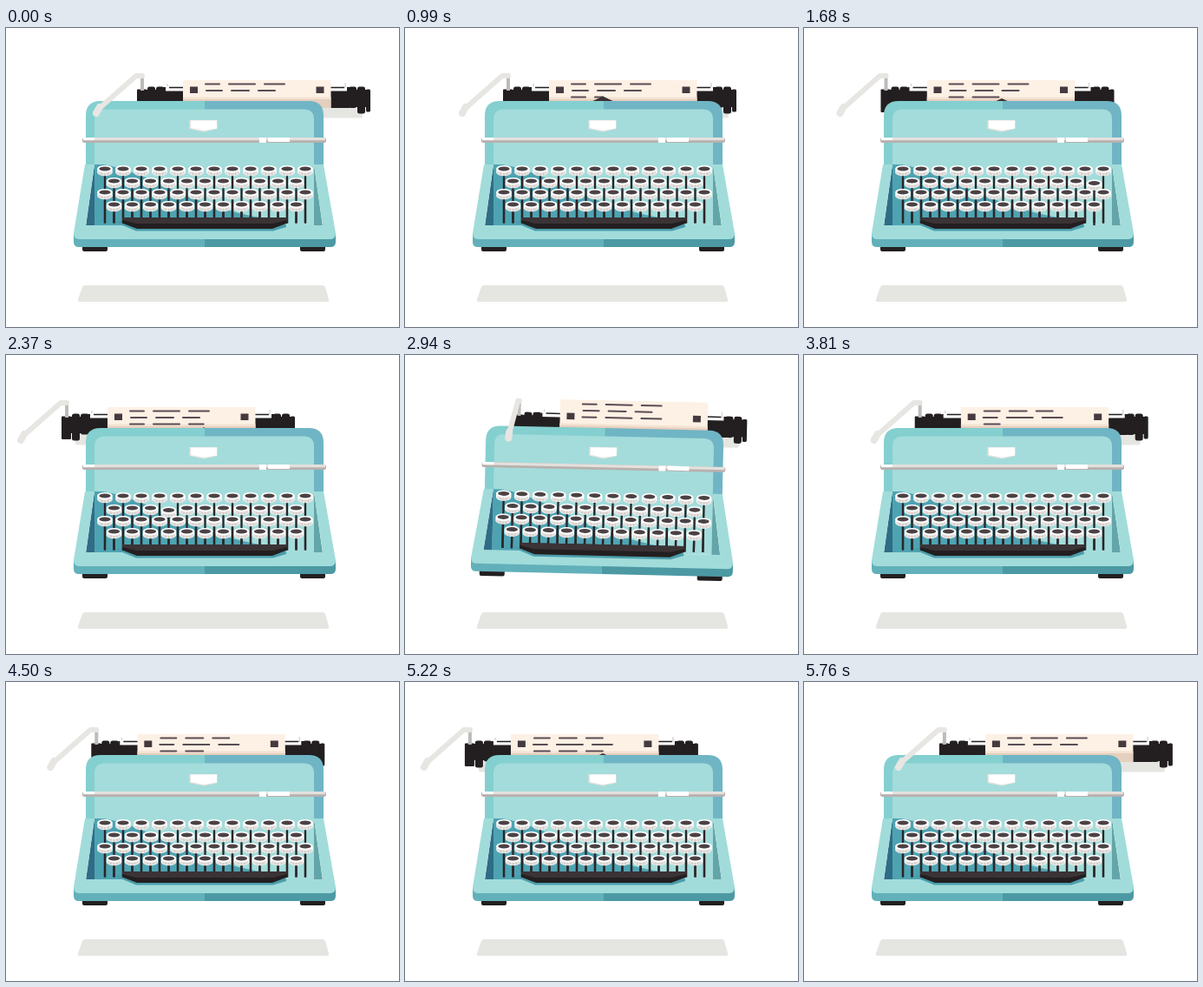
Recreate the animation shown at these times as an HTML page. Size 453x344 px, loop 5.91 s.

```html
<!DOCTYPE html>
<html lang="en">
<head>
<meta charset="utf-8">
<title>Typewriter</title>
<style>
  html, body { margin: 0; width: 100%; height: 100%; overflow: hidden; background: #fff; }
  svg { display: block; }
  .ink { fill: #231f20; }
  .pale { fill: #e5e5e1; }
  .words { stroke: #5b4c54; stroke-width: 2; stroke-linecap: round; fill: none; }
  .lever { stroke: #e7e6e3; fill: none; stroke-linecap: round; stroke-linejoin: round; }
  .lever path { vector-effect: non-scaling-stroke; }
</style>
</head>
<body>
<svg width="453" height="344" viewBox="0 0 453 344">
  <defs>
    <path id="lineA" class="words" d="M26 2h16M53 2h30M94 2h23"/>
    <path id="lineB" class="words" d="M27 2h18M56 2h20M87 2h19"/>
    <g id="key">
      <path d="M-8.7-2.5V2.2A8.7 4 0 0 0 8.7 2.2V-2.5z" fill="#fff"/>
      <path d="M-8.2 3A8.7 4 0 0 0 8.2 3L7 .6A8 4 0 0 1-7 .6z" fill="#e3dedb"/>
      <path d="M-3.5 2.3v3.4M0 2.7v3.4M3.5 2.3v3.4" stroke="#cbc4c0" stroke-width=".8"/>
      <ellipse cy="-2.2" rx="8.7" ry="3.9" fill="#fff"/>
      <ellipse cy="-2.1" rx="6.6" ry="2.5" fill="#4b4245"/>
    </g>
  </defs>

  <path d="M91 296H365Q367 296 368 298L372 312Q373 315 370 315H85Q82 315 83 312L88 298Q89 296 91 296z" class="pale"/>

  <g id="machine">
    <g id="carriage">
      <rect x="167" y="88" width="244" height="15.500" rx="2" class="pale"/>
      <g class="ink">
        <rect x="151" y="70.500" width="11" height="26.500" rx="1"/>
        <rect x="163" y="67.500" width="9" height="31" rx="2.500"/>
        <rect x="173" y="67.500" width="9.500" height="24" rx="2.500"/>
        <rect x="160" y="71" width="25" height="19"/>
        <rect x="182" y="68" width="214" height="24"/>
        <rect x="392" y="71" width="24" height="20"/>
        <rect x="395" y="67.500" width="9" height="24.500" rx="2.500"/>
        <rect x="405" y="67.500" width="9" height="31" rx="2.500"/>
        <rect x="415" y="70.500" width="5" height="26" rx="1.500"/>
      </g>
      <path d="M184 64h3v3h18v5.500H184zM374 67h16v-4h3v9.500H374z" fill="#fff"/>
      <path d="M186 64v3M391 63v6" stroke="#d9d8d4" stroke-width="1.500"/>
      <path d="M188 68.500h17M373 68.500h17" stroke="#231f20" stroke-width="1.500"/>
      <svg id="paper" x="204" y="60" width="170.500" height="32">
        <rect width="171" height="60" fill="#fdf1e5"/>
        <g id="sheet">
          <rect y="79.500" width="171" height="3" fill="#f4e2d3"/>
          <rect y="82" width="171" height="10" fill="#e5cfbe"/>
          <g id="rows">
            <svg y="62.500" width="171" height="4"><use href="#lineA"/></svg>
            <svg y="70" width="171" height="4"><use href="#lineB"/></svg>
            <svg class="typed" y="77.500" width="0" height="4"><use href="#lineA"/></svg>
            <svg class="typed" y="85" width="0" height="4"><use href="#lineB"/></svg>
          </g>
          <path d="M8 67.500h9v7.500H8zM153.500 67.500h9v7.500h-9z" fill="#453a40"/>
        </g>
      </svg>
    </g>

    <path id="typebar" fill="#3b3034"/>

    <!-- shell -->
    <path d="M229 84V158H92V101Q92 84 109 84z" fill="#84cfcf"/>
    <path d="M229 84H349Q366 84 366 101V158H229z" fill="#70b5c5"/>
    <path d="M102 227V105Q102 93.500 114 93.500H343Q355 93.500 355 105V227z" fill="#a3dcdb"/>
    <path d="M102 157H112C165 165 215 207 300 219V228H102z" fill="#4ea3b2"/>
    <path d="M102 157L92 228H102z" fill="#2f6c86"/>
    <path d="M355 157V228H365z" fill="#63a5a8"/>

    <!-- base -->
    <path d="M88 250h29v5q0 2-2 2H90q-2 0-2-2zM339 250h29v5q0 2-2 2H341q-2 0-2-2z" class="ink"/>
    <path d="M78 236H229V252H84Q78 252 78 246z" fill="#62b0ba"/>
    <path d="M229 236H380V246Q380 252 374 252H229z" fill="#4c99a4"/>
    <path d="M91 157H102L92 227H365L355 157H366L380 236Q380 243 374 243H84Q78 243 78 236z" fill="#a1dcda"/>
    <path d="M122 222H322L323 229 308 233.500H150z" fill="#4b9dab"/>

    <!-- trim and name plate -->
    <rect x="88" y="126" width="281" height="6" rx="2.500" fill="#b8b0ad"/>
    <path d="M89 126H368V129.300H89z" fill="#e4e0dd"/>
    <path d="M89 126h13v3H89zM292 126h8v6h-8zM302 126h25v5h-25z" fill="#fff"/>
    <path d="M211.500 106H243.500V116L228 119.500 211.500 116z" fill="#e7e3df"/>
    <path d="M213 106.500H243V115.500L228 118 213 115z" fill="#fff"/>

    <g id="keys"></g>
    <g id="space">
      <path d="M134 218H324V224.500L307 231H151L134 224.500z" class="ink"/>
      <path d="M134 218H324V221L308 225H150L134 221z" fill="#3b3335"/>
    </g>

    <g id="arm">
      <path d="M157 56V72" stroke="#bcbcb8" stroke-width="4"/>
      <g id="lever" class="lever">
        <path d="M0 55H-7L-49 92" stroke-width="6"/>
        <path d="M-49 91L-53 98" stroke-width="8"/>
      </g>
    </g>
  </g>
</svg>

<script>
const LOOP = 5910, FEED = 7.5, STEP = 4.9, RETURN_TIME = 540;
const $ = id => document.getElementById(id);
const clamp = v => Math.min(1, Math.max(0, v));
const smooth = v => (v = clamp(v)) * v * (3 - 2 * v);
const bump = v => Math.sin(Math.PI * clamp(v));
const move = (el, x, y) => el.setAttribute('transform', `translate(${x} ${y})`);

function track(points, t, ease = v => v) {
  if (t <= points[0][0]) return points[0][1];
  for (let i = 1; i < points.length; i++) {
    const [t0, a] = points[i - 1], [t1, b] = points[i];
    if (t <= t1) return a + (b - a) * ease((t - t0) / (t1 - t0));
  }
  return points[points.length - 1][1];
}

// Keystroke count over time for the two lines
const lines = [
  { last: 19, back: 2700, strokes: [[210, 0], [790, 7], [990, 8.45], [1360, 11],
      [1930, 15], [2370, 18.15], [2490, 19], [2640, 19.99]] },
  { last: 17, back: 5220, strokes: [[3240, -1], [3310, 0], [3810, 5], [4960, 15],
      [5145, 17], [5220, 17.68], [5250, 17.99]] }
];
const tilts = [[0, 0], [150, .4], [240, 1.25], [300, 2.2], [430, -4.2], [RETURN_TIME, 0]];
const swings = [[0, 1], [130, .22], [290, .22], [440, 1]];

const keys = [];
[[114, 164, 12], [124.5, 178, 11], [114, 191, 12], [124.5, 205, 11]].forEach(([x0, y, n]) => {
  for (let i = 0; i < n; i++) {
    const x = x0 + i * 21;
    const key = document.createElementNS('http://www.w3.org/2000/svg', 'g');
    key.innerHTML = `<path d="M${x} ${y}V224.500" stroke="#2b2527" stroke-width="2.300"/>` +
      `<use href="#key" x="${x}" y="${y}"/>`;
    $('keys').append(key);
    keys.push(key);
  }
});
const typed = document.querySelectorAll('.typed');

// Carriage place after k strokes; the first stroke is shorter
const place = k => -STEP * k + 1.2 * clamp(k);

function carriageAt(k, last) {
  k = Math.min(k, last);
  const n = Math.floor(k);
  return place(n + smooth((k - n - .55) / .45));
}

function draw(t) {
  const second = t >= 3240 && t < 5760;
  const line = lines[second ? 1 : 0];
  const k = t >= 5760 ? -1 : track(line.strokes, t);
  const n = Math.floor(k), part = k - n;
  const since = t >= 5760 ? -1 : t - line.back;

  let x = carriageAt(k, line.last);
  if (since > 0) x += (STEP - x) * clamp(since / 295) ** 2;
  move($('carriage'), x, 0);
  $('arm').setAttribute('transform', `translate(${x} 0)`);
  $('lever').setAttribute('transform', `translate(157 0) scale(${track(swings, since, smooth)} 1)`);
  $('machine').setAttribute('transform', `rotate(${track(tilts, since, smooth)} 229 150)`);

  // Paper feeds up one line, then its top settles back
  const feed = smooth((since - 90) / 130);
  const top = 60 - 8 * feed * (1 - smooth((since - 440) / 90));
  $('paper').setAttribute('y', top);
  $('paper').setAttribute('height', 92 - top);
  move($('sheet'), 0, -top);
  move($('rows'), 0, -FEED * (feed + (second ? 1 : 0)));

  const shown = since > 0 ? 171 : Math.max(0, 24.5 - x);
  typed[0].setAttribute('width', second ? 171 : shown);
  typed[1].setAttribute('width', second ? shown : 0);

  // Key, space bar and type bar
  const press = k >= 0 ? bump(part / .4) : 0;
  const isSpace = n % 7 === 5;
  const hit = (n * 17 + 31) % keys.length;
  keys.forEach((key, i) => move(key, 0, i === hit && !isSpace ? 2.8 * press : 0));
  move($('space'), 0, isSpace ? 1.5 * press : 0);
  const h = k >= 0 && !isSpace && since < 60 ? 6.5 * bump((part - .1) / .7) : 0;
  $('typebar').setAttribute('d', h > .2
    ? `M${228 - 2.1 * h} 85L228 ${85 - h}L${228 + 2.1 * h} 85z` : '');
}

const start = performance.now();
function tick() {
  draw((performance.now() - start) % LOOP);
  requestAnimationFrame(tick);
}
tick();
</script>
</body>
</html>
```
